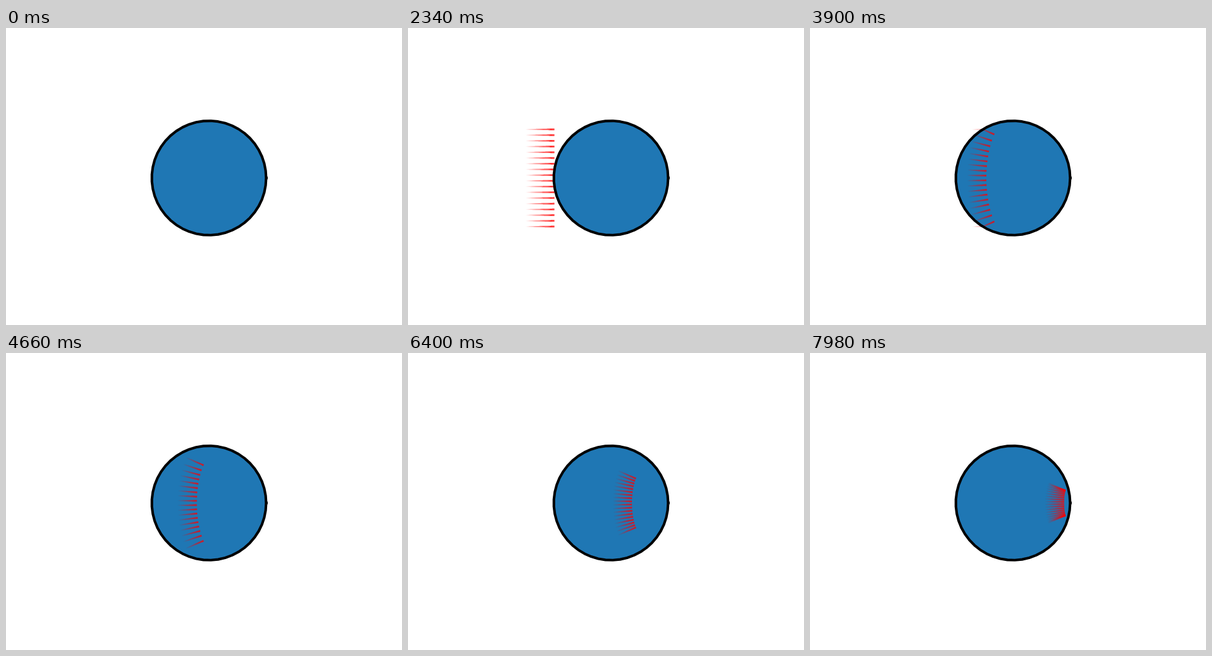
These frames come from a looping animation (640x480 px, 8 s). An HTML page with a canvas:

```html
<!DOCTYPE html>
<html lang="en">
<head>
<meta charset="utf-8">
<title>Refraction in a sphere</title>
<style>
html, body { margin: 0; width: 100%; height: 100%; overflow: hidden; background: #fff; }
canvas { display: block; }
</style>
</head>
<body>
<canvas id="stage" width="640" height="480"></canvas>
<script>
const ctx = document.getElementById('stage').getContext('2d');

const LOOP = 8000, TICK = 20, DELAY = 16;   // ms, ms, ticks
const CX = 328, CY = 242.4, R = 92.4;
const STEP = 0.01, INDEX = 1.5, TRAIL = 50;
const START = -2, RAYS = 18;
const ENTRY_LEAD = 0.0075;

// Snell's law at the left side of a unit circle
const rays = Array.from({ length: RAYS }, (_, i) => {
  const y = -0.85 + i * 0.1;
  const x = -Math.sqrt(1 - y * y);
  const turn = Math.asin(y) - Math.asin(y / INDEX);
  return { x, y, dx: Math.cos(turn), dy: -Math.sin(turn) };
});

function position(ray, tick) {
  const x = START + tick * STEP;
  if (x <= ray.x) return [CX + R * x, CY + R * ray.y];
  const d = (x - ray.x) / INDEX + ENTRY_LEAD;
  return [CX + R * (ray.x + d * ray.dx), CY + R * (ray.y + d * ray.dy)];
}

function circlePath() {
  const sides = 49;
  ctx.beginPath();
  for (let i = 0; i <= sides; i++) {
    const a = i / sides * 2 * Math.PI;
    ctx.lineTo(CX + R * Math.cos(a), CY - R * Math.sin(a));
  }
}

function drawTrail(ray, tick) {
  for (let k = Math.max(0, tick - TRAIL); k < tick; k++) {
    const fresh = 1 - (tick - 1 - k) / TRAIL;
    ctx.strokeStyle = `rgba(255,0,0,${fresh})`;
    ctx.lineWidth = 1.5 + 1.28 * fresh;
    ctx.beginPath();
    ctx.moveTo(...position(ray, k));
    ctx.lineTo(...position(ray, k + 1));
    ctx.stroke();
  }
}

function draw(t) {
  const tick = Math.floor(t / TICK) - DELAY;
  ctx.fillStyle = '#fff';
  ctx.fillRect(0, 0, 640, 480);

  circlePath();
  ctx.fillStyle = '#1f77b4';
  ctx.fill();

  ctx.lineCap = 'butt';
  for (const ray of rays) drawTrail(ray, tick);

  circlePath();
  ctx.strokeStyle = '#000';
  ctx.lineWidth = 4.17;
  ctx.lineCap = 'square';
  ctx.lineJoin = 'round';
  ctx.stroke();

  // small nub where the outline's ends meet
  ctx.fillStyle = '#000';
  ctx.fillRect(420, CY - 2.1, 3, 4.2);
}

const begin = performance.now();
function frame() {
  draw((performance.now() - begin) % LOOP);
  requestAnimationFrame(frame);
}
frame();
</script>
</body>
</html>
```
